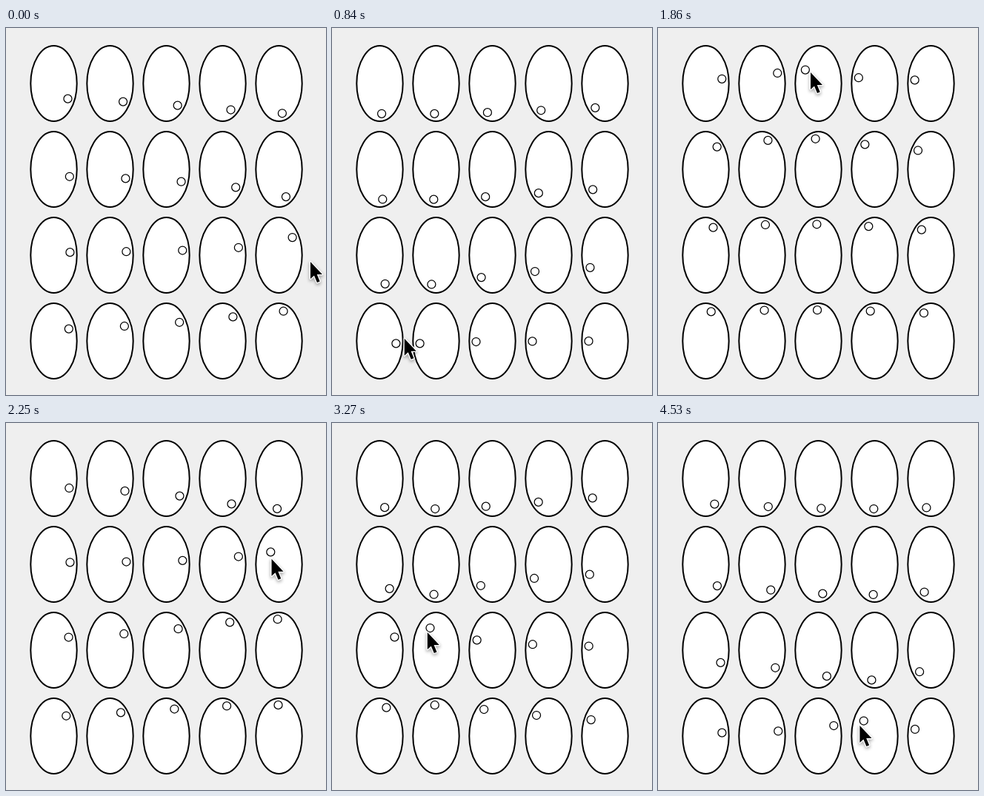
Animation, 432 px wide and 496 px high, one loop 4.56 s. Source, as an HTML page with a canvas:

```html
<!DOCTYPE html>
<html>
<head>
<meta charset="utf-8">
<title>Watching eyes</title>
<style>
  html, body { margin: 0; height: 100%; overflow: hidden; background: #efefef; }
  canvas { display: block; }
</style>
</head>
<body>
<canvas width="432" height="496"></canvas>
<script>
const ctx = document.querySelector('canvas').getContext('2d');
const LOOP = 4560, STEP = 30, KEY_GAP = 270;
const REACH_X = 22, REACH_Y = 41.5;

// Evenly timed mouse positions; the first and last only set the end slopes
const keys = [
  [351, -316], [410, 278], [365, 430], [245, 451], [116, 433],
  [56, 340], [61, 175], [112, 86], [205, 59], [345, 148],
  [335, 214], [203, 208], [150, 215], [130, 272], [133, 307],
  [204, 307.5], [308, 295], [322, 348], [272, 412], [370, 402]
];

// Catmull-Rom spline through the keys
function mouseAt(t) {
  const i = Math.floor(t / KEY_GAP), u = t / KEY_GAP - i;
  return [0, 1].map(axis => {
    const [a, b, c, d] = keys.slice(i, i + 4).map(key => key[axis]);
    return b + u / 2 * (c - a + u * (2 * a - 5 * b + 4 * c - d + u * (3 * (b - c) + d - a)));
  });
}

function oval(x, y, rx, ry, lineWidth) {
  ctx.beginPath();
  ctx.ellipse(x, y, rx, ry, 0, 0, 2 * Math.PI);
  ctx.fillStyle = '#fff';
  ctx.fill();
  ctx.strokeStyle = '#000';
  ctx.lineWidth = lineWidth;
  ctx.stroke();
}

function eye(x, y, [mx, my]) {
  const dx = mx - x, dy = my - y;
  const dist = Math.hypot(dx, dy), angle = Math.atan2(dy, dx);
  oval(x, y + 0.4, 31.2, 51, 2);
  oval(x + Math.cos(angle) * Math.min(dist, REACH_X),
       y + Math.sin(angle) * Math.min(dist, REACH_Y), 5.5, 5.5, 1.25);
}

const arrow = new Path2D('M0 0V23L5 18.5L9 28L12.7 26.5L8.8 17H16Z');

function cursor([x, y]) {
  ctx.save();
  ctx.translate(x + 1, y + 1);
  ctx.lineJoin = 'round';
  ctx.shadowColor = 'rgba(0,0,0,.4)';
  ctx.shadowBlur = 4;
  ctx.shadowOffsetY = 2;
  ctx.strokeStyle = '#fff';
  ctx.lineWidth = 2.6;
  ctx.stroke(arrow);
  ctx.shadowColor = 'transparent';
  ctx.fillStyle = '#000';
  ctx.fill(arrow);
  ctx.restore();
}

function draw() {
  const t = Math.floor(performance.now() % LOOP / STEP) * STEP;
  const mouse = mouseAt(t);
  ctx.fillStyle = '#efefef';
  ctx.fillRect(0, 0, 432, 496);
  for (let row = 0; row < 4; row++)
    for (let col = 0; col < 5; col++)
      eye(64.5 + 76 * col, 74.6 + 116 * row, mouse);
  cursor(mouseAt(t + STEP)); // the eyes trail the pointer by one step
  requestAnimationFrame(draw);
}
draw();
</script>
</body>
</html>
```
